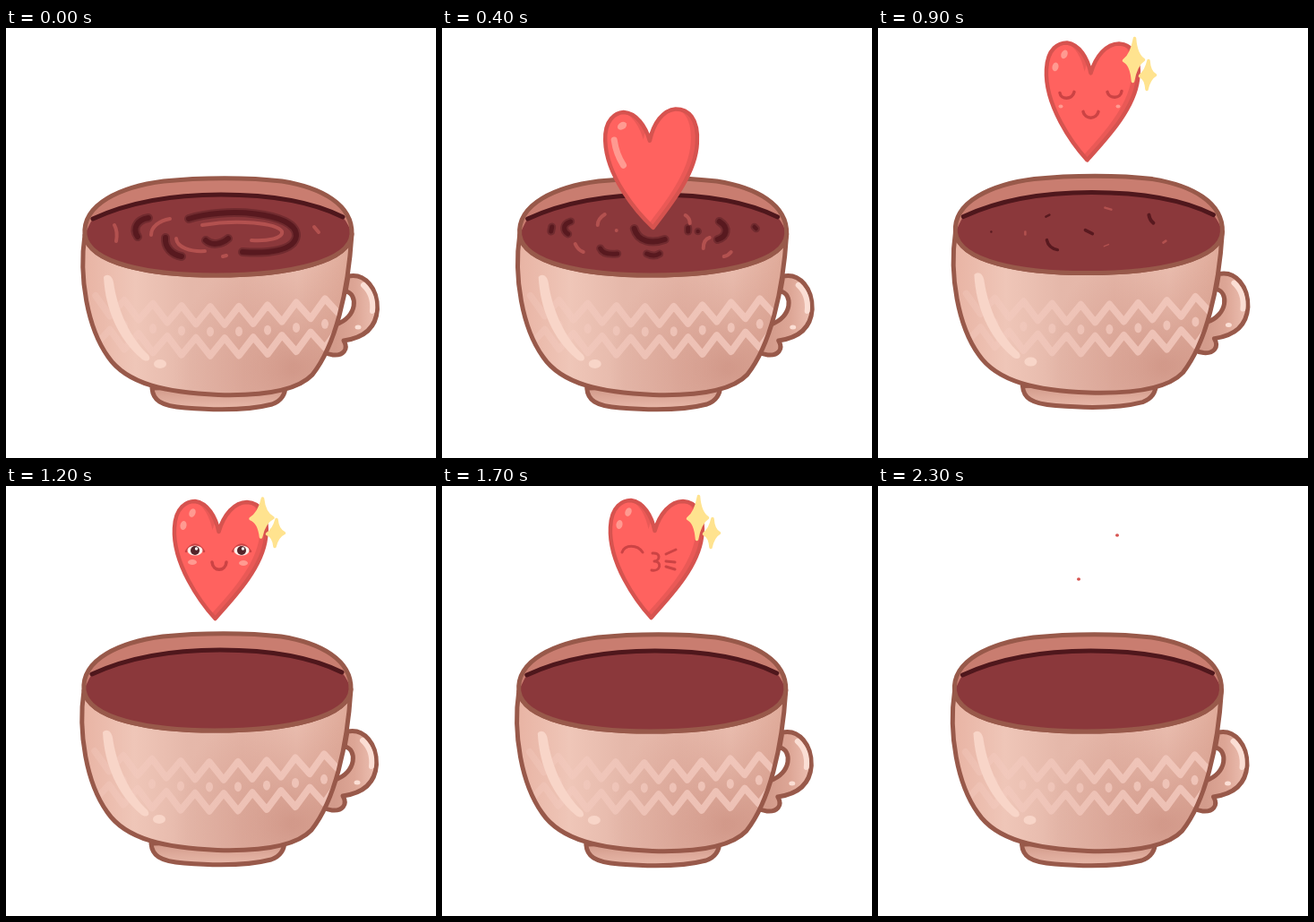
An HTML page with a canvas that plays this animation: 480 px wide and 480 px high, repeating every 2.4 s.

```html
<!DOCTYPE html>
<html>
<head>
<meta charset="utf-8">
<style>
html, body { margin: 0; width: 100%; height: 100%; overflow: hidden; background: #fff; }
canvas { display: block; width: 480px; height: 480px; }
</style>
</head>
<body>
<canvas id="stage" width="480" height="480"></canvas>
<script>
const c = document.getElementById('stage').getContext('2d');
const LINE = '#98594a', RED = '#ff625f', EDGE = '#d6534f', SHADE = '#ea5956', FACE = '#cc4344', SHINE = '#ff9a91';
const DARK = '#58191f', HALO = '#712b2f', LIGHT = '#b3514f';
const P = d => new Path2D(d);

function fill(path, color) { c.fillStyle = color; c.fill(path); }
function line(path, color, width) {
  c.strokeStyle = color;
  c.lineWidth = width;
  c.stroke(path);
}
function oval(x, y, rx, ry, color, turn = 0) {
  c.beginPath();
  c.ellipse(x, y, rx, ry, turn, 0, 7);
  c.fillStyle = color;
  c.fill();
}
function gradient(g, colors) {
  colors.forEach((col, i) => g.addColorStop(i / (colors.length - 1), col));
  return g;
}
// Linear interpolation through [time, value] pairs
function keys(t, list) {
  let k = 1;
  while (k < list.length - 1 && t > list[k][0]) k++;
  const [a, u] = list[k - 1], [b, v] = list[k];
  return u + (v - u) * (t - a) / (b - a);
}

const LIP = 'C382 258 318 274 232 274 C158 274 91 261 86 229';
const body = P('M86 229 C79 276 89 333 112 365 C133 396 178 405 235 407.5 C290 409 324 402 340 385 C366 352 380 292 384 228 ' + LIP + ' Z');
const rim = P('M86 229 C83 194 127 175 174 169 C215 164.5 270 164.5 306 169 C350 176 385 195 384 228 ' + LIP + ' Z');
const TOP = 'C136 192 186 184 238 184 C292 184 340 192 374 209';
const liquid = P('M86 229 C89 222 91 217 95 211 ' + TOP + ' C379 215 382 222 384 228 ' + LIP + ' Z');
const surface = P('M95 211 ' + TOP);
const foot = P('M161 400 C162 413 170 420 198 422 C235 425 272 424 295 418 C306 414 310 407 310 397 Z');
const handle = P('M380 275 C399 271 413 289 412.5 312 C411 334 396 344 375 347 C381 357 374 364 363 363 C355 362 351 359 347 352 L366 329 C391 321 391 294 377 292 Z');

function zigzag(mid, dir) {
  const p = new Path2D();
  for (let k = -10; k <= 7; k++) {
    const x = 258 + k * 16, odd = k & 1 ? 1 : -1;
    p.lineTo(x, mid - 10 * ((x - 236) / 125) ** 2 + odd * dir * 10);
  }
  return p;
}
const zigs = [zigzag(319, 1), zigzag(354, -1)];

const bodyTone = gradient(c.createLinearGradient(82, 0, 384, 0),
  ['#e8b3a3', '#efc6b8', '#e5b8aa', '#e5b6a8', '#edc2b4', '#dea897']);
const shadeTone = gradient(c.createRadialGradient(320, 378, 5, 320, 378, 135),
  ['rgba(193,127,111,.6)', 'rgba(200,138,122,.3)', 'rgba(200,138,122,0)']);
const zigTone = gradient(c.createLinearGradient(95, 0, 363, 0),
  ['rgba(244,203,192,.3)', 'rgba(244,203,192,.6)', 'rgba(244,203,192,.75)', 'rgba(244,203,192,.8)']);
const handleTone = gradient(c.createLinearGradient(365, 0, 412, 0), ['#d39b8b', '#dda696', '#edc0b2']);
const footTone = gradient(c.createLinearGradient(0, 402, 0, 424), ['#d49d8d', '#e9b9aa']);

const mark = (color, width, d) => ({ color, width, path: P(d) });
const swirl = [
  mark(DARK, 6, 'M202 211 C240 198 323 203 322 230 C320 247 290 250 262 248'),
  mark(DARK, 6, 'M157 210 C144 212 139 222 145 231'),
  mark(DARK, 6, 'M176 232 C175 243 183 251 194 253'),
  mark(DARK, 6, 'M221 235 C227 241 238 240 246 233'),
  mark(LIGHT, 4, 'M217 218 C258 211 300 216 306 225 C308 233 290 236 272 235'),
  mark(LIGHT, 4, 'M188 233 C189 243 204 248 220 247'),
  mark(LIGHT, 4, 'M160 229 C160 220 169 213 181 211'),
  mark(LIGHT, 4, 'M119 218 Q123 225 121 236 M342 220 l5 6 M240 253 l4 -1')
];
const dashes = [
  mark(DARK, 6, 'M214 222 C218 237 234 239 248 234 M309 214 C320 221 317 231 307 234'),
  mark(DARK, 5, 'M143 214 C133 217 135 225 140 228 M176 244 C178 249 185 251 195 250'),
  mark(DARK, 5, 'M228 250 q8 4 14 0 M122 220 l-1 5 M274 221 l0 4'),
  mark(DARK, 4.5, 'M285 225 l0 0 M348 220 l2 2'),
  mark(LIGHT, 4, 'M181 206 Q173 211 173 218 M148 239 Q151 246 157 248 M271 207 q5 3 5 9'),
  mark(LIGHT, 4, 'M291 244 Q291 234 298 232 M314 253 q5 -1 8 -5 M194 224 l0 0')
];
const spots = [
  mark(DARK, 7, 'M188 237 Q190 246 200 248 M231 226 l8 4'),
  mark(DARK, 8, 'M302 209 Q303 215 307 218'),
  mark(DARK, 5, 'M126 228 l0 0 M187 211 l4 -2'),
  mark(LIGHT, 5, 'M164 228 l0 3 M253 201 l7 2 M318 240 l3 -2'),
  mark(LIGHT, 3, 'M252 244 l5 -2')
];

function ripples(i) {
  if (i > 10) return;
  const set = i < 2 ? swirl : i < 6 ? dashes : spots;
  const size = i < 7 ? 1 : (11 - i) / 4;
  for (const m of set) {
    if (m.color == DARK && set != spots) line(m.path, HALO, m.width + 4);
    line(m.path, m.color, m.width * size);
  }
}

function cup(i) {
  c.save();
  c.translate(keys(i, [[0, 2], [4, .7], [7, 0], [12, 1], [17, -.2], [23, -.5]]),
              keys(i, [[0, 2], [4, 2], [7, 0], [12, -1], [17, 0], [23, 0]]));
  fill(foot, footTone);
  line(foot, LINE, 5);
  fill(handle, handleTone);
  line(handle, LINE, 5);
  line(P('M397 285 Q409 296 407 314'), '#fbded4', 6);
  oval(391, 332, 3.5, 2.5, '#fbded4');
  fill(body, bodyTone);
  c.save();
  c.clip(body);
  fill(body, shadeTone);
  for (const z of zigs) line(z, zigTone, 7.5);
  for (let x = 130; x < 360; x += 32)
    oval(x, 337 - 9 * ((x - 236) / 120) ** 2, 4, 5.5, zigTone);
  fill(P('M107 276 C111 271 117 275 118 282 C123 315 137 344 157 363 C161 369 155 372 149 367 C123 345 109 312 107 276 Z'), '#f8d5c8');
  oval(170, 373, 7, 5, '#f8d5c8');
  c.restore();
  line(body, LINE, 5);
  fill(rim, '#c97d70');
  fill(liquid, '#8b383b');
  ripples(i);
  line(surface, '#4f171c', 5);
  line(rim, LINE, 5);
  c.restore();
}

const heartShape = P('M233.5 147 C217 129 186 86 188 46 C189 22 202 16 211 16 C225 18 234 33 237.5 50 C243 31 255 17 269 17 C283 18 294 29 290 57 C286 90 256 122 233.5 147 Z');
const blob = P('M247 48 C239 35 221 33 212 40 C202 54 205 88 217 104 C228 118 260 119 276 98 C289 82 289 56 286 49 C277 37 257 41 247 48 Z');

function shaded(shape, width, dx, dy) {
  fill(shape, SHADE);
  c.save();
  c.clip(shape);
  c.translate(-dx, -dy);
  fill(shape, RED);
  c.restore();
  line(shape, EDGE, width);
}

function openEye(x) {
  line(P(`M${x - 10} 72 Q${x} 57 ${x + 10} 72`), FACE, 2.5);
  oval(x, 71, 8.5, 5.5, '#fff0ea');
  oval(x, 71, 5, 5, '#54242a');
  oval(x + 1.5, 69, 1.7, 1.7, '#fff');
}

function kiss() {
  line(P('M235 75 C244 74 244 83 237 84 C246 84 244 96 234 94'), FACE, 3);
}

function face(i) {
  if (i < 10) {
    line(P('M203 72 C204 80 217 80 219 71 M256 71 C258 79 271 79 272 70 M229 93 C231 102 244 102 246 93'), FACE, 3.5);
    oval(204, 87, 2.5, 2, SHINE);
    oval(268, 87, 2.5, 2, SHINE);
  } else if (i < 15) {
    openEye(211);
    openEye(263);
    oval(208, 84, 5, 3, SHINE);
    oval(265, 85, 5, 3, SHINE);
    line(P('M230 84 C231 95 245 95 246 84'), FACE, 3.5);
  } else {
    line(P('M201 74 C204 65 218 65 224 74 M250 76 L261 71 M250 84 L260 85 M250 90 L260 93'), FACE, 3);
    kiss();
  }
}

function star(x, y, rx, ry) {
  const p = new Path2D(), q = .22;
  p.moveTo(x + 1, y - ry);
  p.quadraticCurveTo(x + rx * q, y - ry * q, x + rx, y);
  p.quadraticCurveTo(x + rx * q, y + ry * q, x - 1, y + ry);
  p.quadraticCurveTo(x - rx * q, y + ry * q, x - rx, y + 1);
  p.quadraticCurveTo(x - rx * q, y - ry * q, x + 1, y - ry);
  fill(p, '#ffe38f');
  line(p, '#ffe38f', 3.5);
}

function heart(i) {
  const drop = i < 7 ? [0, 182, 152, 112, 76, 34, -2][i] : keys(i, [[7, 0], [12, 1], [17, 0], [18, 8]]);
  const tilt = keys(Math.min(i, 7), [[1, -.08], [4, -.08], [7, 0]]);
  c.save();
  if (i < 5) {
    c.beginPath();
    c.rect(0, 0, 480, 224);
    c.ellipse(235, 222, 55, 8, 0, 0, 7);
    c.clip();
  }
  c.translate(234 + tilt * 40, 80 + drop);
  c.rotate(tilt);
  if (i == 18) c.scale(.96, .9);
  c.translate(-234, -80);
  shaded(heartShape, 4.5, 7, 2);
  if (i < 6) {
    oval(208, 31, 5.5, 4, SHINE, -.5);
    line(P('M198 46 Q199 62 206 75'), SHINE, 7);
  } else {
    oval(208, 29, 3.5, 5, SHINE, .4);
    oval(198, 43, 3.5, 5, SHINE, .2);
    face(i);
  }
  c.restore();
  if (i > 5 && i < 18) {
    const thin = (1 - Math.cos((i - 7) * Math.PI / 2)) / 2;
    star(285.5, 35.5, 14 - 3 * thin, 19 + 5 * thin);
    star(301, 52.5, 10.5 - 2 * thin, 14 + 2 * thin);
  }
}

function burst(i) {
  const k = i - 19;
  if (k < 3) {
    const s = [1, .55, .2][k];
    c.save();
    c.translate(246, 76);
    c.scale(s, s);
    c.translate(-246, -76);
    shaded(blob, 3.5, 2, 6);
    oval(225, 46, 4, 3, SHINE, .3);
    line(P('M215 53 Q211 64 214 75'), SHINE, 4);
    line(P('M250 72 L265 61 M253 79 L268 76 M252 85 L264 88'), FACE, 3);
    c.translate(2, -1);
    kiss();
    c.restore();
  }
  if (k == 4) {
    oval(267, 55, 2, 1.8, EDGE);
    oval(224, 104, 2, 1.8, EDGE);
    return;
  }
  const far = 1 + k * .06, size = 1 - k * .2;
  const drops = [[249, 34, 6, 4.5], [238, 28, 2, 1.5], [198, 67, 2.3, 2.5], [198, 75, 2, 2], [251, 121, 5, 2], [261, 118, 1.7, 1.5]];
  for (const [x, y, rx, ry] of drops)
    oval(246 + (x - 246) * far, 76 + (y - 76) * far, rx * size, ry * size, EDGE, y < 40 ? .5 : -.2);
}

function draw(now) {
  const i = Math.floor(now % 2400 / 100);
  c.fillStyle = '#fff';
  c.fillRect(0, 0, 480, 480);
  c.lineCap = c.lineJoin = 'round';
  cup(i);
  if (i > 0 && i < 19) heart(i);
  if (i > 18) burst(i);
}

const start = performance.now();
function tick() {
  draw(performance.now() - start);
  requestAnimationFrame(tick);
}
tick();
</script>
</body>
</html>
```
